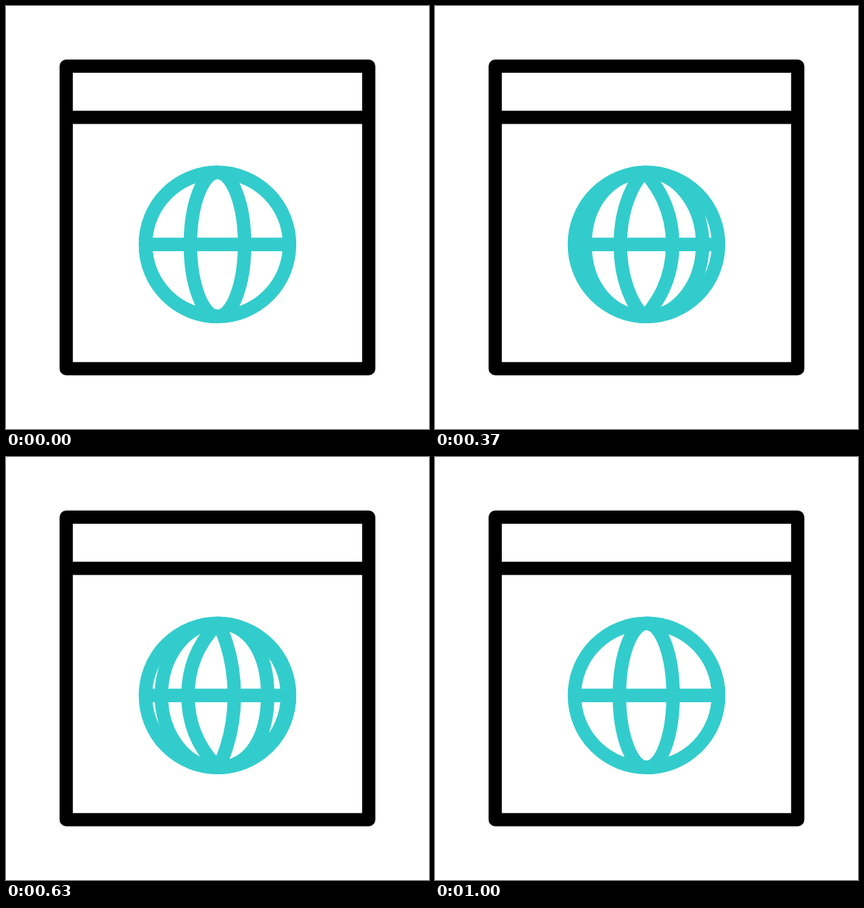
Recreate the animation shown at these times as an HTML page with a canvas. Size 640x640 px, loop 1630 ms.

```html
<!DOCTYPE html>
<html lang="en">
<head>
<meta charset="utf-8">
<title>Browser globe</title>
<style>
  html, body { margin: 0; width: 100%; height: 100%; overflow: hidden; background: #fff; }
  canvas { display: block; width: 640px; height: 640px; }
</style>
</head>
<body>
<canvas id="stage" width="640" height="640"></canvas>
<script>
const ctx = document.getElementById('stage').getContext('2d');
const LOOP = 1630;
const LAST = 30;
const CX = 320, CY = 360.8, R = 109;
const REST = 41;
const KAPPA = 0.5523;

// Each meridian swings once from one equator offset to another;
// skew makes its pole ends trail (-) or lead (+) on the way.
const meridians = [
  { from: REST, to: R, start: 0, length: 18.5, skew: 0 },
  { from: -REST, to: R, start: 0, length: 21, skew: -28 },
  { from: -R, to: R, start: 2.6, length: 22, skew: 13 },
  { from: -R, to: R, start: 7.5, length: 20, skew: -13 },
  { from: -R, to: REST, start: 9, length: 22, skew: 28 },
  { from: -R, to: -REST, start: 11.5, length: 18.5, skew: 0 }
];

function drawWindow() {
  ctx.strokeStyle = '#000';
  ctx.lineWidth = 20;
  ctx.lineJoin = 'round';
  ctx.strokeRect(91.1, 91.1, 457.7, 457.7);
  ctx.beginPath();
  ctx.moveTo(91, 168.45);
  ctx.lineTo(549, 168.45);
  ctx.stroke();
}

function drawMeridian(m, step) {
  const u = Math.min(Math.max((step - m.start) / m.length, 0), 1);
  const ease = (1 - Math.cos(Math.PI * u)) / 2;
  const x = m.from + (m.to - m.from) * ease;
  const bend = m.skew * 4 * ease * (1 - ease);
  const pull = x * KAPPA + bend;
  const hy = R * KAPPA + Math.abs(bend) / 2;
  ctx.beginPath();
  ctx.moveTo(0, -R);
  ctx.bezierCurveTo(pull, -R, x, -hy, x, 0);
  ctx.bezierCurveTo(x, hy, pull, R, 0, R);
  ctx.stroke();
}

function drawGlobe(step) {
  ctx.save();
  ctx.translate(CX, CY);
  ctx.strokeStyle = '#33cccc';
  ctx.lineWidth = 20.4;
  ctx.beginPath();
  ctx.arc(0, 0, R, 0, Math.PI * 2);
  ctx.moveTo(-R, 0);
  ctx.lineTo(R, 0);
  ctx.stroke();
  ctx.beginPath();
  ctx.arc(0, 0, R + 10.2, 0, Math.PI * 2);
  ctx.clip();
  for (const m of meridians) drawMeridian(m, step);
  ctx.restore();
}

// Thirty steps per second on a 10 ms grid; the first one starts at 70 ms.
function stepAt(ms) {
  const step = Math.floor(0.3 * Math.floor(ms / 10) + 0.15);
  return step < 2 ? 0 : Math.min(step, LAST);
}

function render() {
  ctx.fillStyle = '#fff';
  ctx.fillRect(0, 0, 640, 640);
  drawWindow();
  drawGlobe(stepAt((performance.now() - start) % LOOP));
  requestAnimationFrame(render);
}

const start = performance.now();
render();
</script>
</body>
</html>
```
